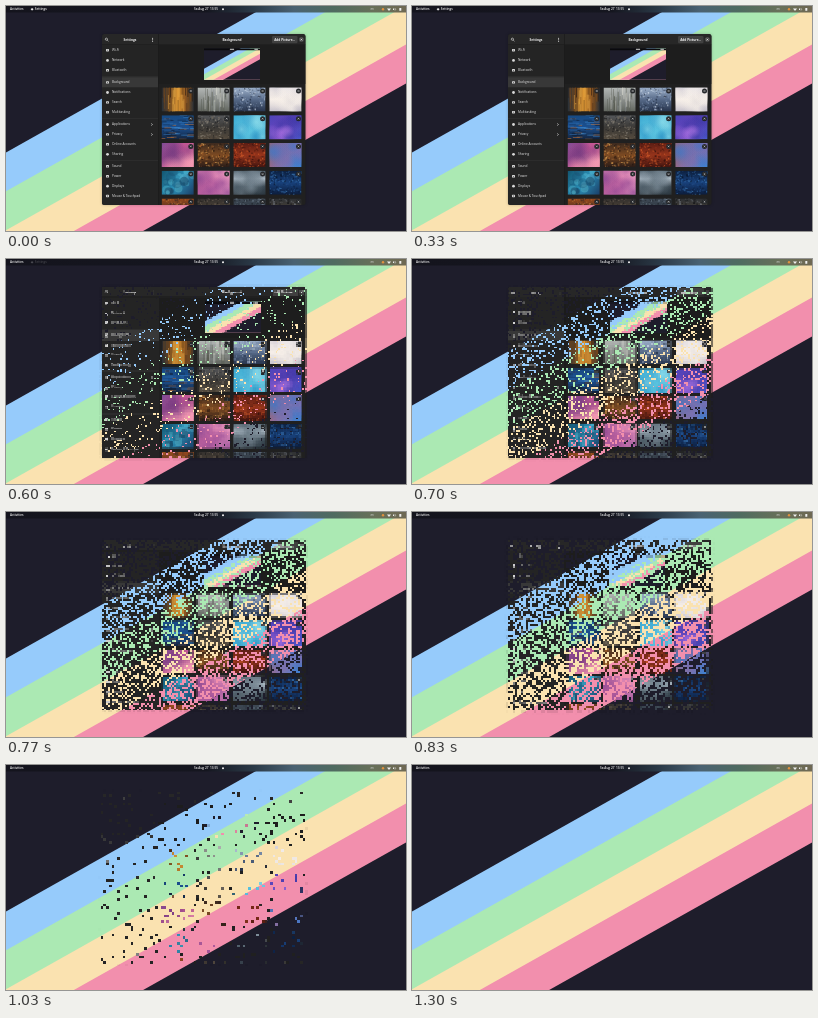
Animation, 400 px wide and 225 px high, one loop 1500 ms. Source, as an HTML page with a canvas:

```html
<!DOCTYPE html>
<html lang="en">
<head>
<meta charset="utf-8">
<title>Settings window dissolving</title>
<style>
html, body { margin: 0; width: 100%; height: 100%; overflow: hidden; background: #1e1d2b; }
canvas { display: block; width: 100vw; height: 100vh; }
</style>
</head>
<body>
<canvas id="stage" width="400" height="225"></canvas>
<script>
const LOOP = 1500, START = 330, END = 1300;
const WIN = { x: 92, y: 24, w: 212, h: 180 };
const FONT = '"Open Sans", "Noto Sans", sans-serif';

const ctx = document.getElementById('stage').getContext('2d');

function layer(w, h) {
  const c = document.createElement('canvas');
  c.width = w;
  c.height = h;
  return c.getContext('2d');
}

function seeded(seed) {
  return () => {
    seed = (seed + 0x6d2b79f5) | 0;
    let n = Math.imul(seed ^ (seed >>> 15), 1 | seed);
    n = (n + Math.imul(n ^ (n >>> 7), 61 | n)) ^ n;
    return ((n ^ (n >>> 14)) >>> 0) / 4294967296;
  };
}

function cellHash(i, j) {
  let n = Math.imul(i + 17, 0x9e3779b1) ^ Math.imul(j + 91, 0x85ebca77);
  n = Math.imul(n ^ (n >>> 16), 0x85ebca6b);
  n = Math.imul(n ^ (n >>> 13), 0xc2b2ae35);
  return ((n ^ (n >>> 16)) >>> 0) / 4294967296;
}

function rect(g, color, x, y, w, h, r = 0) {
  g.fillStyle = color;
  g.beginPath();
  g.roundRect(x, y, w, h, r);
  g.fill();
}

function dot(g, color, x, y, r) {
  g.fillStyle = color;
  g.beginPath();
  g.arc(x, y, r, 0, 7);
  g.fill();
}

function line(g, color, width, ...pts) {
  g.strokeStyle = color;
  g.lineWidth = width;
  g.beginPath();
  for (let i = 0; i < pts.length; i += 2) g.lineTo(pts[i], pts[i + 1]);
  g.stroke();
}

function text(g, str, x, y, size, { color = '#e6e6e6', align = 'left', weight = 400 } = {}) {
  g.font = `${weight} ${size}px ${FONT}`;
  g.fillStyle = color;
  g.textAlign = align;
  g.textBaseline = 'middle';
  g.fillText(str, x, y);
}

function ramp(g, x0, y0, x1, y1, colors) {
  const grad = g.createLinearGradient(x0, y0, x1, y1);
  colors.forEach((c, i) => grad.addColorStop(i / (colors.length - 1), c));
  return grad;
}

// Desktop

function drawWallpaper(g) {
  const dark = '#1e1d2b', rise = 400 * .5615;
  rect(g, dark, 0, 0, 400, 225);
  // Each band covers everything below its top edge, so no seams show
  ['#96cbfb', '#abe9b3', '#fae2b0', '#f28fad', dark].forEach((color, i) => {
    const y = 146.4 + i * 38.9;
    g.fillStyle = color;
    g.beginPath();
    g.moveTo(0, y);
    g.lineTo(400, y - rise);
    g.lineTo(400, 400);
    g.lineTo(0, 400);
    g.fill();
  });
}

function drawBar(g) {
  const grad = g.createLinearGradient(0, 0, 400, 0);
  [[0, '#14141d'], [.5, '#15161f'], [.62, '#2b3a48'], [.72, '#4a6272'],
   [.82, '#4f6b60'], [.92, '#687059'], [1, '#6e6853']].forEach(s => grad.addColorStop(...s));
  rect(g, grad, 0, 0, 400, 6.5);
  const bold = { weight: 600, color: '#f4f4f4' };
  text(g, 'Activities', 4, 3.3, 3.1, bold);
  text(g, 'Sa Aug 27  13:55', 200, 3.3, 3.1, { ...bold, align: 'center' });
  dot(g, '#f4f4f4', 217, 3.3, 1);
  text(g, 'en', 364.5, 3.3, 2.9, { color: '#dedede' });
  dot(g, '#e0913f', 377, 3.3, 1.2);
  g.fillStyle = '#f0f0f0';
  g.beginPath();
  g.moveTo(381, 2.4);
  g.lineTo(385, 2.4);
  g.lineTo(383, 4.9);
  g.fill();
  rect(g, '#f0f0f0', 387, 2.6, 1.2, 1.5);
  line(g, '#f0f0f0', .5, 389, 2.2, 389.7, 3.3, 389, 4.5);
  rect(g, '#f0f0f0', 393.3, 2, 2, 2.8, .4);
}

function drawAppLabel(g, alpha) {
  if (alpha <= 0) return;
  g.globalAlpha = Math.min(1, alpha);
  line(g, '#e4e4e4', .5, 24.7, 3.3, 27.5, 3.3);
  dot(g, '#e4e4e4', 26.1, 3.3, 1.1);
  text(g, 'Settings', 28.8, 3.3, 3.1, { weight: 600, color: '#f4f4f4' });
  g.globalAlpha = 1;
}

// Settings window

const SIDEBAR = [
  ['Wi-Fi', 44.3], ['Network', 54.4], ['Bluetooth', 64.4],
  ['Background', 76.5], ['Notifications', 86.5], ['Search', 96.5], ['Multitasking', 106.3],
  ['Applications', 118.5], ['Privacy', 128.5], ['Online Accounts', 138.4], ['Sharing', 148.3],
  ['Sound', 160.4], ['Power', 170.4], ['Displays', 180.2], ['Mouse & Touchpad', 190.1]
];

// Each picture: gradient direction, gradient colours, detail kind, detail colours
const PICTURES = [
  ['h', '#26303a #6a4420 #e09a35 #8a5420 #2a3036', 'streak', '#f0b24a #2b1c14 #7a4a1a'],
  ['v', '#b3b7b5 #8b8f8c #62665f', 'streak', '#d8d9d0 #55594f #7d8386'],
  ['v', '#9fb2cb #566987 #27344c', 'grain', '#d3deeb #1f2a3e #7f94b4'],
  ['v', '#d9d6e2 #f3ebe6 #c9c4cd', 'haze', '#f9f2ea #bdb8c4'],
  ['v', '#174a83 #1c4f8e #14253f', 'dash', '#3e8bd0 #0f1c31 #b66c35'],
  ['v', '#55575a #3b3936 #544a3d', 'grain', '#a39b8d #1f1f20 #756d60'],
  ['d', '#3aa6d0 #66cfe6 #3a9fc8', 'haze', '#96e4ee #2d94c6'],
  ['d', '#4a44b8 #8a4fd0 #4a63d6', 'haze', '#b377e6 #3435a0'],
  ['d', '#7a4a93 #dd5f9a #ee8fa4', 'haze', '#f59cb4 #743a80'],
  ['v', '#3c2a1f #7c4a22 #2a1c18', 'grain', '#e2a555 #20140f #a9622c'],
  ['v', '#5a1d14 #96341b #431510', 'grain', '#d9622c #2a0d0b #b3421f'],
  ['d', '#b85a44 #8a6fa0 #4088d8', 'haze', '#7b6cb0 #3b78c8'],
  ['d', '#12546f #2b8db4 #1a3d66', 'spot', '#5cc3d8 #17415f #7fd3e3'],
  ['d', '#a74f8f #e079ac #a15ca5', 'haze', '#f3a3c3 #8b4591'],
  ['v', '#4a5a66 #b0bdc7 #3a4750 #1c252c', 'haze', '#3f4e59 #7d8d99'],
  ['v', '#0c2040 #18407a #0c1d3c', 'grain', '#4280bd #08142a #2a5c98'],
  ['v', '#9a4a1c #4a2e22 #1d2230', 'grain', '#c4803f #161b26'],
  ['v', '#33302e #4f4437 #211f1f', 'grain', '#77695a #191818'],
  ['v', '#3f4a56 #2a323c #1d2229', 'grain', '#8496a6 #181c22'],
  ['v', '#2d3034 #4a4238 #1b1c1f', 'grain', '#70747a #141518']
];

// Each kind: count, opacity, size
const DETAIL = {
  streak: [34, .8, () => [.9, 14]],
  grain: [150, .75, r => [.6 + r() * 1.3, .6 + r() * 1.3]],
  dash: [60, .8, r => [3 + r() * 8, .8]],
  spot: [24, .5, r => [1 + r() * 4, 0]],
  haze: [14, .28, r => [6 + r() * 9, 0]]
};

function drawPicture(g, index, x, y, w, h) {
  const [dir, colors, kind, accents] = PICTURES[index];
  const rnd = seeded(index * 77 + 5);
  const tones = accents.split(' ');
  const [count, alpha, size] = DETAIL[kind];
  g.save();
  g.beginPath();
  g.rect(x, y, w, h);
  g.clip();
  rect(g, ramp(g, x, y, dir === 'v' ? x : x + w, dir === 'h' ? y : y + h, colors.split(' ')), x, y, w, h);
  for (let i = 0; i < count; i++) {
    const px = x + rnd() * w, py = y + rnd() * h;
    const [a, b] = size(rnd);
    const color = tones[Math.floor(rnd() * tones.length)];
    g.globalAlpha = alpha * (.4 + .6 * rnd());
    if (kind === 'haze') {
      const glow = g.createRadialGradient(px, py, 0, px, py, a);
      glow.addColorStop(0, color);
      glow.addColorStop(1, color + '00');
      g.globalAlpha = .55;
      dot(g, glow, px, py, a);
    } else if (kind === 'spot') {
      dot(g, color, px, py, a);
    } else {
      rect(g, color, px - a / 2, py - b / 2, a, b);
    }
  }
  g.globalAlpha = 1;
  dot(g, '#25272a', x + w - 3, y + 3.4, 2.5);
  line(g, '#eeeeee', .5, x + w - 3.8, y + 2.6, x + w - 2.2, y + 4.2);
  line(g, '#eeeeee', .5, x + w - 2.2, y + 2.6, x + w - 3.8, y + 4.2);
  g.restore();
}

function drawSidebar(g) {
  rect(g, '#242424', 96, 39, 56, 160);
  rect(g, '#383838', 96, 71.2, 56, 10);
  [70, 112.4, 154.4].forEach(y => rect(g, '#343434', 96, y, 56, .6));
  SIDEBAR.forEach(([label, y], i) => {
    if (i % 3 === 1) {
      dot(g, '#d6d6d6', 101.5, y, 1.4);
    } else {
      rect(g, '#d6d6d6', 100, y - 1.3, 3, 2.4, .6);
      rect(g, '#555', 100.9, y - .5, 1.2, .8);
    }
    text(g, label, 106, y, 3.15);
    if (label === 'Applications' || label === 'Privacy') {
      line(g, '#dddddd', .6, 145.2, y - 1.1, 146.5, y, 145.2, y + 1.1);
    }
  });
}

function drawHeader(g) {
  rect(g, '#272727', 96, 28, 203.5, 11, [2.5, 2.5, 0, 0]);
  rect(g, '#1a1a1a', 96, 38.6, 203.5, .5);
  const title = { weight: 700, align: 'center', color: '#f2f2f2' };
  text(g, 'Settings', 124, 33.7, 3.2, title);
  text(g, 'Background', 226, 33.7, 3.2, title);
  g.strokeStyle = '#e8e8e8';
  g.lineWidth = .6;
  g.beginPath();
  g.arc(100.4, 33.2, 1.1, 0, 7);
  g.stroke();
  line(g, '#e8e8e8', .7, 101.2, 34, 102.4, 35.2);
  [32.2, 33.7, 35.2].forEach(y => dot(g, '#e8e8e8', 146.6, y, .55));
  rect(g, '#404040', 266, 30, 25.5, 7.3, 1.3);
  text(g, 'Add Picture…', 278.7, 33.7, 3.2, title);
  dot(g, '#4c4c4c', 295.4, 33.6, 2.5);
  line(g, '#ffffff', .6, 294.5, 32.7, 296.3, 34.5);
  line(g, '#ffffff', .6, 296.3, 32.7, 294.5, 34.5);
}

function drawPreview(g) {
  g.save();
  g.translate(198, 42.3);
  g.scale(.14, .14);
  g.beginPath();
  g.rect(0, 0, 400, 225);
  g.clip();
  drawWallpaper(g);
  rect(g, '#0a0a0d', 0, 0, 400, 14);
  rect(g, '#dddddd', 185, 4, 30, 6);
  rect(g, '#dddddd', 360, 4, 25, 6);
  g.restore();
}

function drawWindow(g) {
  g.translate(-WIN.x, -WIN.y);
  g.save();
  g.shadowColor = 'rgba(0,0,0,.25)';
  g.shadowBlur = 3;
  rect(g, '#202020', 96, 28, 203.5, 171, 2.5);
  g.restore();
  g.save();
  g.beginPath();
  g.roundRect(96, 28, 203.5, 171, 2.5);
  g.clip();
  drawSidebar(g);
  drawHeader(g);
  rect(g, '#1a1a1a', 152, 28, .6, 171);
  rect(g, '#1d1d1d', 152.6, 39, 147, 39);
  drawPreview(g);
  PICTURES.forEach((p, i) => {
    drawPicture(g, i, 155.6 + (i % 4) * 35.9, 81.6 + Math.floor(i / 4) * 27.7, 32.2, 24);
  });
  g.restore();
}

const desktop = layer(400, 225);
drawWallpaper(desktop);
drawBar(desktop);

const win = layer(WIN.w + 8, WIN.h + 8);
drawWindow(win);

const cells = layer(WIN.w, WIN.h);

// Share of cells already gone at a given time
const GONE = [[330, 0], [470, .008], [600, .065], [700, .21], [830, .5],
              [930, .76], [1030, .925], [1150, .98], [1300, 1]];

function goneAt(t) {
  if (t >= END) return 1;
  const i = GONE.findIndex(p => p[0] > t);
  const [t0, a] = GONE[i - 1], [t1, b] = GONE[i];
  return a + (b - a) * (t - t0) / (t1 - t0);
}

function drawDissolve(t) {
  const size = Math.max(1, .7 + 2.8 * (t - START) / (END - START));
  const nx = Math.ceil(WIN.w / size), ny = Math.ceil(WIN.h / size);
  const gone = goneAt(t);
  cells.clearRect(0, 0, WIN.w, WIN.h);
  cells.imageSmoothingEnabled = false;
  cells.drawImage(win.canvas, 0, 0, nx * size, ny * size, 0, 0, nx, ny);
  for (let j = 0; j < ny; j++) {
    for (let i = 0; i < nx; i++) {
      if (cellHash(i, j) < gone) cells.clearRect(i, j, 1, 1);
    }
  }
  ctx.imageSmoothingEnabled = false;
  ctx.drawImage(cells.canvas, 0, 0, nx, ny, WIN.x, WIN.y, nx * size, ny * size);
}

function render(time) {
  // Hold each pose for a thirtieth of a second, on 10 ms marks
  const step = Math.floor((Math.floor(time / 10) * 10 + 4) * 30 / 1000);
  const t = Math.min(END, step * 1000 / 30);
  ctx.drawImage(desktop.canvas, 0, 0);
  drawAppLabel(ctx, 1 - (t - 400) / 250);
  if (t < START + 5) ctx.drawImage(win.canvas, WIN.x, WIN.y);
  else if (t < END) drawDissolve(t);
}

const origin = performance.now();
function tick() {
  render((performance.now() - origin) % LOOP);
  requestAnimationFrame(tick);
}
tick();
</script>
</body>
</html>
```
